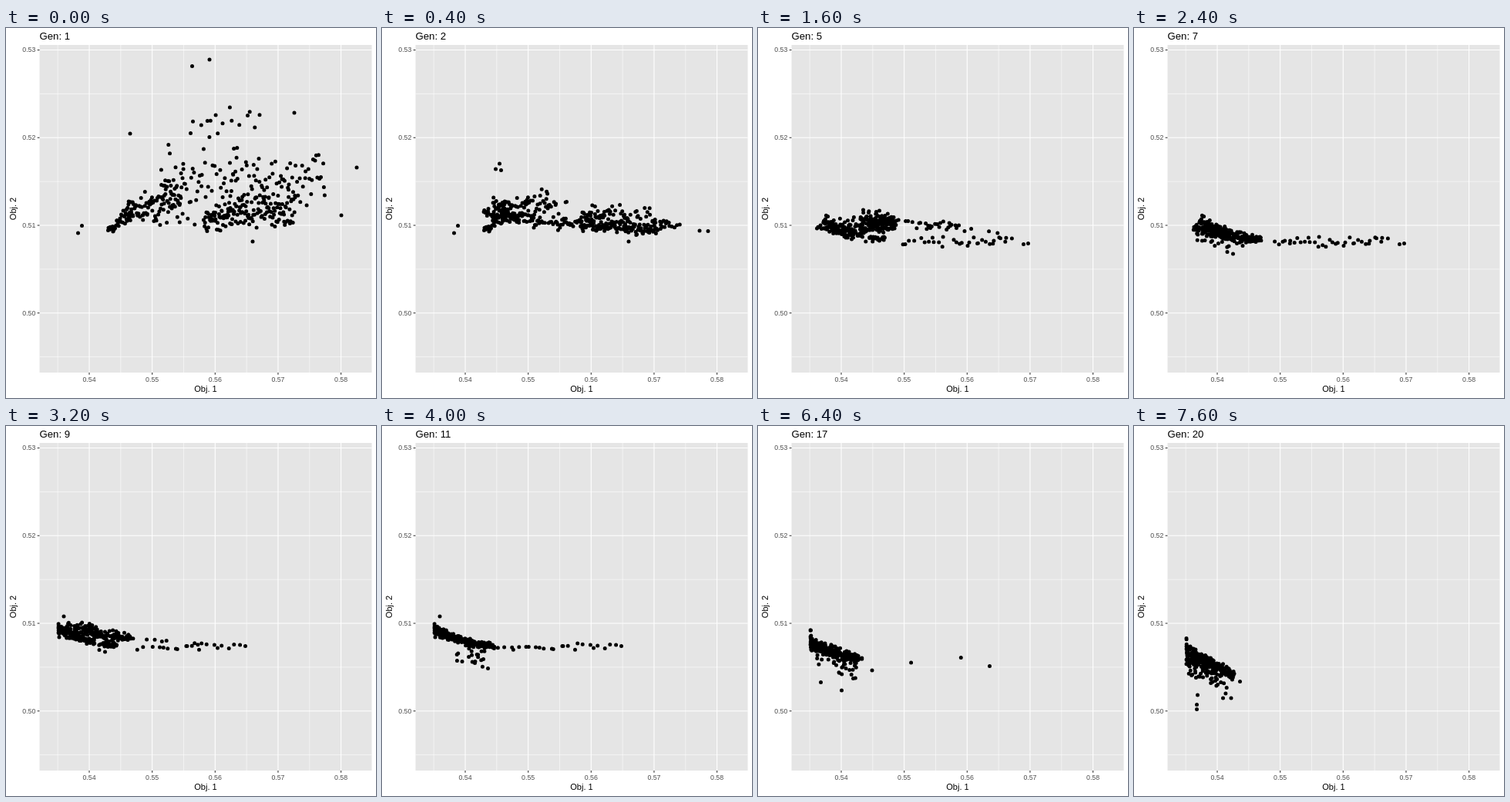
An HTML page for the animation above (8000 ms loop, 480 by 480 pixels).

```html
<!DOCTYPE html>
<html lang="en">
<head>
<meta charset="utf-8">
<title>Population by generation</title>
<style>
  html, body { margin: 0; width: 100%; height: 100%; overflow: hidden; background: #fff; }
  svg { display: block; width: 100vw; height: 100vh; }
  text { font-family: "Liberation Sans", Arial, Helvetica, sans-serif; }
  .tick { font-size: 8.8px; fill: #4d4d4d; }
  .name { font-size: 11px; text-anchor: middle; }
  #dots { fill: none; stroke: #000; stroke-width: 5; stroke-linecap: round; }
</style>
</head>
<body>
<svg viewBox="0 0 480 480">
  <rect x="43.5" y="22" width="431" height="425" fill="#e5e5e5"/>
  <g id="axes"></g>
  <path id="dots"/>
  <text id="title" x="43.5" y="15" font-size="13.2"></text>
  <text class="name" x="259" y="472">Obj. 1</text>
  <text class="name" transform="translate(13 234.5) rotate(-90)">Obj. 2</text>
</svg>
<script>
const STEP = 400, COUNT = 20;
const PANEL = { left: 43.5, right: 474.5, top: 22, bottom: 447 };
const WALL = 68; // no point lies further left once the front has formed
const $ = id => document.getElementById(id);
const mix = (a, b, t) => a + (b - a) * t;

function random(seed) {
  return () => {
    seed = (seed + 0x6D2B79F5) | 0;
    let t = Math.imul(seed ^ (seed >>> 15), 1 | seed);
    t = (t + Math.imul(t ^ (t >>> 7), 61 | t)) ^ t;
    return ((t ^ (t >>> 14)) >>> 0) / 4294967296;
  };
}

// Collects the points of one generation, the worst first.
function population(gen, build) {
  const rand = random(gen * 7919);
  const points = [];
  const add = (x, y) => points.push({ x, y, score: x / 6 - y + rand() * 20 });
  const noise = () => rand() + rand() - 1;
  // Scatters n points around a line whose half width runs from w0 to w1.
  const streak = (n, x0, y0, x1, y1, w0, w1) => {
    for (let i = 0; i < n; i++) {
      const u = (i + rand()) / n;
      add(mix(x0, x1, u), mix(y0, y1, u) + noise() * mix(w0, w1, u));
    }
  };
  build({ rand, add, noise, streak });
  points.sort((a, b) => b.score - a.score);
  points.forEach((p, i) => p.rank = i / points.length);
  return { gen, points };
}

const first = population(1, ({ add, streak }) => {
  streak(42, 132, 262, 165, 238, 8, 14);
  streak(95, 155, 236, 230, 218, 14, 48);
  streak(65, 200, 205, 300, 195, 60, 65);
  streak(150, 256, 248, 375, 230, 19, 32);
  streak(75, 290, 200, 415, 198, 58, 38);
  streak(14, 235, 115, 335, 118, 28, 18);
  add(264, 41);
  add(241.5, 49.5);
  add(374, 110);
  add(455, 181);
  add(435, 243);
  add(161, 137);
  add(98.5, 256.5);
  add(93.5, 266);
  add(320, 277);
});

const second = population(3, ({ add, streak }) => {
  streak(30, 95, 258, 136, 252, 13, 18);
  streak(170, 132, 251, 178, 251, 19, 14);
  streak(60, 143, 245, 163, 247, 30, 28);
  streak(35, 168, 252, 212, 252, 16, 7);
  streak(150, 216, 254, 358, 261, 8, 11);
  streak(10, 352, 260, 388, 256, 6, 2);
  add(152.5, 176);
  add(147.5, 183);
  add(154.5, 184.5);
  add(76.5, 260);
  add(191, 280.5);
  add(412, 263);
  add(423, 263.5);
});

const third = population(7, ({ add, streak }) => {
  streak(25, 77, 260, 90, 258, 8, 14);
  streak(150, 86, 255, 124, 270, 15, 9);
  streak(105, 108, 266, 165, 275, 10, 6);
  streak(14, 82, 276, 145, 283, 5, 7);
  streak(36, 182, 277, 330, 276, 8, 7);
  add(121, 290.5);
  add(128.5, 293);
  add(344.5, 280.5);
  add(350.5, 279.5);
});

// The late front sinks and steepens while its right tail dies out.
function lateFront(gen, lone) {
  const t = (gen - 11) / 9;
  return population(gen, ({ rand, add, noise, streak }) => {
    const endX = mix(146, 130, t);
    const topY = 265 + 10 * t + 20 * t * t;
    const endY = 285 + 7 * t + 32 * t * t;
    const bow = 16 * (1 - t);
    const front = u => mix(topY, endY, u) + bow * u * (1 - u);
    const width = u => mix(8 + 7 * t * t, 4 + 3 * t, u);
    for (let i = 0; i < 250; i++) {
      const u = Math.pow(rand(), 1.25);
      add(mix(WALL, endX, u), front(u) + noise() * width(u));
    }
    for (let i = 0; i < 18 + 24 * t; i++) {
      const u = mix(0.35 * (1 - t), 0.9, rand());
      add(mix(WALL, endX, u), front(u) + 7 + 22 * Math.pow(rand(), 1.4));
    }
    streak(12, WALL, topY - 8 - 12 * t * t, WALL + 1, topY + 6, 6, 8);
    streak(Math.round(24 * (1 - t) ** 2.5), 150, endY + 2, 305, endY + 1, 5, 5);
    for (const [x, y] of lone) add(x, y);
  });
}

const sets = [
  first, second, third,
  lateFront(11, [[75, 247], [120.5, 307.5], [137.5, 314.5], [310.5, 285.5]]),
  lateFront(14, [[119.7, 317], [137.5, 314.5], [257.5, 293], [310.5, 294.5]]),
  lateFront(17, [[68.5, 265], [81.5, 332.5], [108.5, 343], [148, 317], [300.5, 311.5]]),
  lateFront(20, [[82.5, 349], [81.5, 361.5], [81.5, 367.5], [115.5, 353], [126, 353], [137.5, 331.5]])
];

// The worst points leave first; the newcomers nearest to them arrive first.
function generation(g) {
  const next = sets.findIndex(s => s.gen >= g), b = sets[next];
  if (b.gen === g) return b.points;
  const a = sets[next - 1], part = (g - a.gen) / (b.gen - a.gen);
  return [
    ...a.points.filter(p => p.rank >= part),
    ...b.points.filter(p => p.rank < part)
  ];
}

const frames = Array.from({ length: COUNT }, (_, i) =>
  generation(i + 1).map(p => `M${p.x.toFixed(1)} ${p.y.toFixed(1)}h0`).join(""));

function drawAxes() {
  const xAt = v => 108 + (v - 0.54) * 8165;
  const yAt = v => 256 - (v - 0.51) * 11373;
  const line = (x1, y1, x2, y2, color, width) =>
    `<path d="M${x1} ${y1}L${x2} ${y2}" stroke="${color}" stroke-width="${width}"/>`;
  const label = (x, y, anchor, v) =>
    `<text class="tick" x="${x}" y="${y}" text-anchor="${anchor}">${v.toFixed(2)}</text>`;
  const { left, right, top, bottom } = PANEL;
  const across = (v, w) => line(left, yAt(v), right, yAt(v), "#fff", w);
  const down = (v, w) => line(xAt(v), top, xAt(v), bottom, "#fff", w);
  let minor = "", major = "";
  for (let i = 0; i < 5; i++) {
    const v = 0.54 + i / 100, x = xAt(v);
    minor += down(v - 0.005, 0.55);
    major += down(v, 1.07) + line(x, bottom, x, bottom + 2.8, "#333", 1.07)
      + label(x, 459, "middle", v);
  }
  for (let i = 0; i < 4; i++) {
    const v = 0.5 + i / 100, y = yAt(v);
    minor += across(v - 0.005, 0.55);
    major += across(v, 1.07) + line(left - 2.8, y, left, y, "#333", 1.07)
      + label(38.4, y + 2.8, "end", v);
  }
  $("axes").innerHTML = minor + major;
}

let shown = -1;
function draw(time) {
  const i = Math.floor(time / STEP) % COUNT;
  if (i !== shown) {
    shown = i;
    $("dots").setAttribute("d", frames[i]);
    $("title").textContent = `Gen: ${i + 1}`;
  }
}

drawAxes();
draw(0);
const start = performance.now();
function tick() {
  draw(performance.now() - start);
  requestAnimationFrame(tick);
}
requestAnimationFrame(tick);
</script>
</body>
</html>
```
